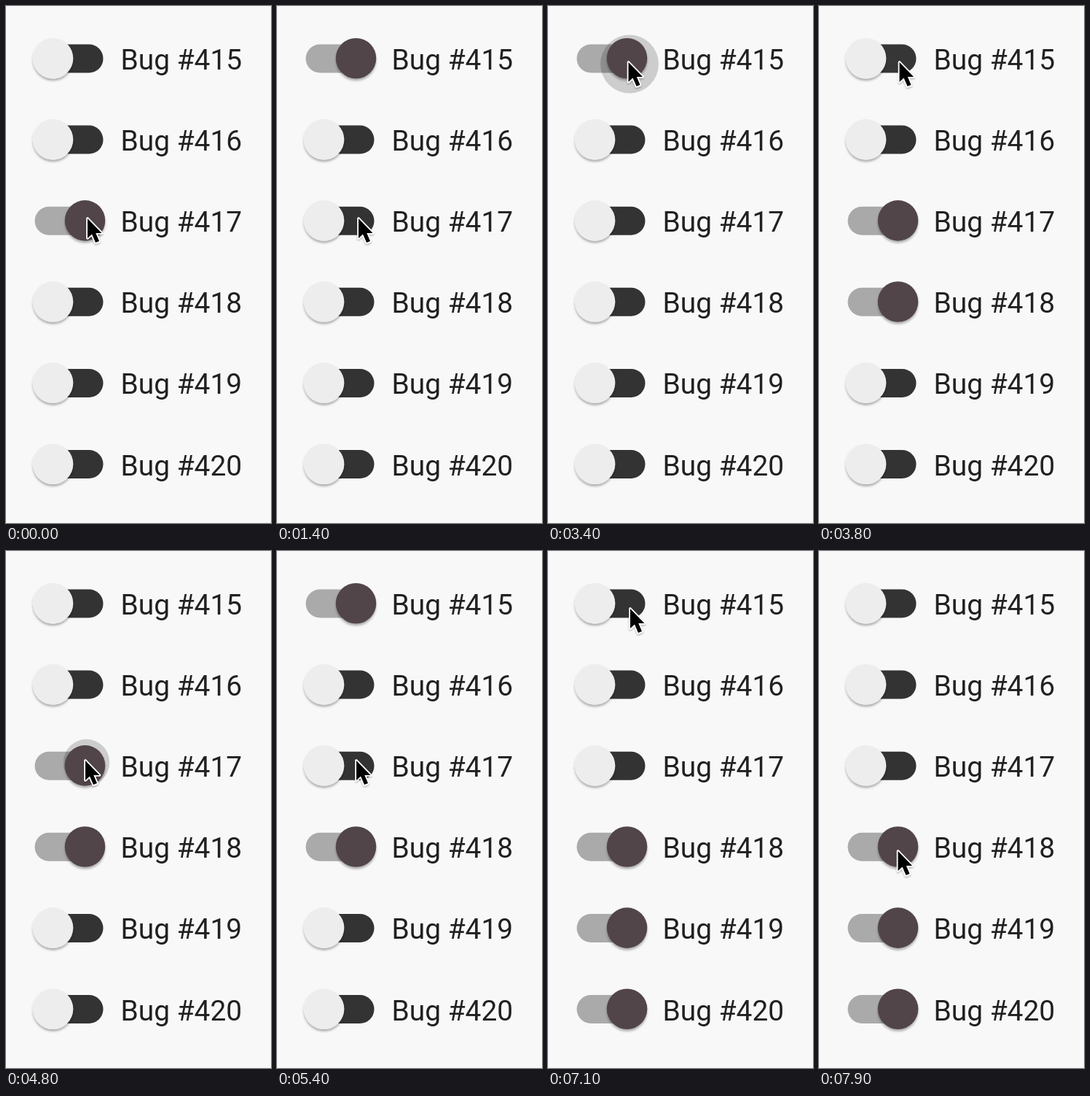
Animation, 364 px wide and 708 px high, one loop 8 s. Source, as an HTML page:

```html
<!DOCTYPE html>
<html lang="en">
<head>
<meta charset="utf-8">
<title>Bug toggles</title>
<style>
html, body { margin: 0; width: 100%; height: 100%; overflow: hidden; background: #f8f8f8; }
svg { display: block; width: 100%; height: 100%; }
text { font: 38.9px Roboto, sans-serif; fill: #212121; }
</style>
</head>
<body>
<svg id="stage" viewBox="0 0 364 708">
  <defs>
    <filter id="lift" x="-30%" y="-30%" width="160%" height="160%">
      <feDropShadow dx="0" dy="2.8" stdDeviation="1.8" flood-color="#000" flood-opacity=".3"/>
    </filter>
    <filter id="soft" x="-30%" y="-30%" width="160%" height="160%">
      <feDropShadow dx="0" dy="1.5" stdDeviation="1.2" flood-color="#000" flood-opacity=".3"/>
    </filter>
  </defs>
  <g id="tracks"></g>
  <circle id="ripple"/>
  <g id="thumbs"></g>
  <g id="labels"></g>
  <path id="cursor" d="M0 0V27L6 21.5L11 33L16 31L11.3 20H19.5Z" fill="#000" stroke="#fff"
    stroke-width="3.6" stroke-linejoin="round" paint-order="stroke" filter="url(#soft)"/>
</svg>
<script>
const LOOP = 8000, ROWS = 6, PITCH = 111.1, TOP = 72;
const OFF = { x: 64.5, thumb: [237, 237, 237], track: [51, 51, 51] };
const ON = { x: 108.5, thumb: [81, 69, 73], track: [170, 170, 170] };
const START = [2];

// Each click flips the listed rows when the button is released.
const clicks = [
  { down: 850, up: 1010, flips: [0, 2] },
  { down: 3322, up: 3490, flips: [0, 2, 3] },
  { down: 4745, up: 4950, flips: [0, 2] },
  { down: 6270, up: 6475, flips: [0, 4, 5] }
];

// Pointer moves: begin, end, then the tip it arrives at.
const home = [112, 291];
const moves = [
  [2430, 3000, 110.5, 77],
  [3850, 4320, 109, 287],
  [5450, 6100, 113, 75.5],
  [7050, 7900, 108.5, 411]
];

const $ = id => document.getElementById(id);
const clamp = p => Math.min(1, Math.max(0, p));
const mix = (a, b, p) => a + (b - a) * p;
const out = p => 1 - (1 - p) ** 3;
const smooth = p => p * p * (3 - 2 * p);
const blend = (a, b, p) => `rgb(${a.map((v, i) => Math.round(mix(v, b[i], p)))})`;

function add(parent, tag, attrs) {
  const el = document.createElementNS('http://www.w3.org/2000/svg', tag);
  set(el, attrs);
  return $(parent).appendChild(el);
}
function set(el, attrs) {
  for (const key in attrs) el.setAttribute(key, attrs[key]);
}

const rows = Array.from({ length: ROWS }, (_, i) => {
  const y = TOP + i * PITCH;
  add('labels', 'text', { x: 157.5, y: y + 15 }).textContent = `Bug #${415 + i}`;
  return {
    track: add('tracks', 'rect', { x: 39.5, y: y - 19.5, width: 94, height: 39, rx: 19.5 }),
    thumb: add('thumbs', 'circle', { cy: y - 0.3, r: 27.8, filter: 'url(#lift)' })
  };
});

function tipAt(t) {
  let tip = home;
  for (const [begin, end, x, y] of moves) {
    const p = smooth(clamp((t - begin) / (end - begin)));
    tip = [mix(tip[0], x, p), mix(tip[1], y, p)];
  }
  return tip;
}

function drawRow(row, i, t) {
  let on = START.includes(i), since = Infinity;
  for (const { up, flips } of clicks) {
    if (t >= up && flips.includes(i)) {
      on = !on;
      since = t - up;
    }
  }
  const [from, to] = on ? [OFF, ON] : [ON, OFF];
  const slide = clamp(since / 80);
  set(row.track, { fill: blend(from.track, to.track, out(clamp(since / 400))) });
  // A thumb turning off keeps its dark tone longer.
  set(row.thumb, {
    cx: mix(from.x, to.x, slide),
    fill: blend(from.thumb, to.thumb, on ? slide : slide ** 3)
  });
}

function drawRipple(t) {
  const click = clicks.find(c => t >= c.down && t < c.up + 320);
  if (!click) return set($('ripple'), { r: 0 });
  const [x, y] = tipAt(click.down);
  const held = t < click.up;
  set($('ripple'), {
    cx: x + 1.5,
    cy: y + 2.5,
    r: 55 * out(clamp((t - click.down) / 225)),
    fill: held ? '#101410' : '#8fcba3',
    'fill-opacity': held ? 0.19 : 0.21 * (1 - clamp((t - click.up) / 320))
  });
}

function draw(t) {
  rows.forEach((row, i) => drawRow(row, i, t));
  drawRipple(t);
  set($('cursor'), { transform: `translate(${tipAt(t)})` });
}

const begun = performance.now();
function tick() {
  draw((performance.now() - begun) % LOOP);
  requestAnimationFrame(tick);
}
tick();
</script>
</body>
</html>
```
